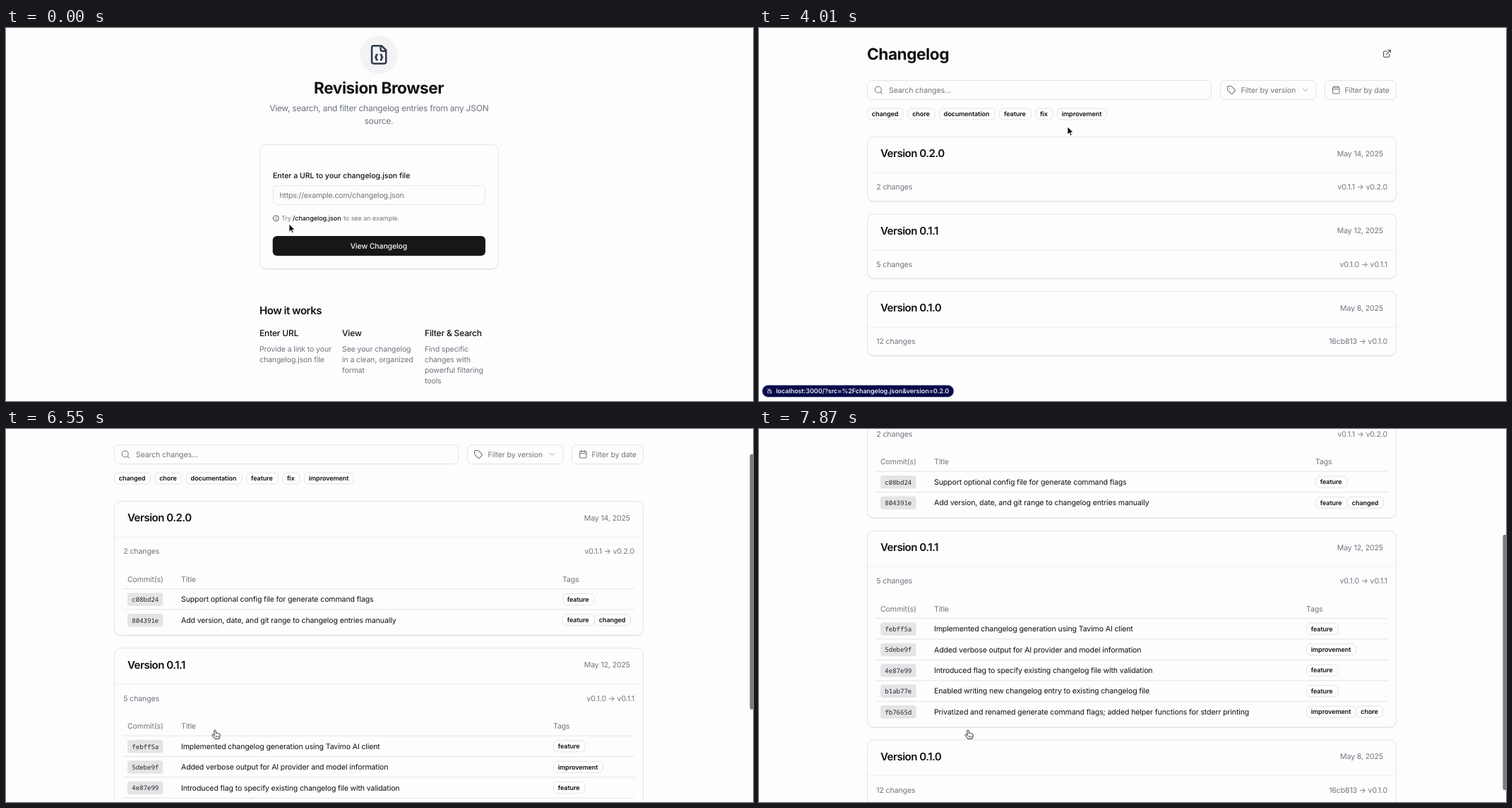
These frames come from a looping animation (1058 by 529 pixels, 8000 ms). An HTML page:

```html
<!DOCTYPE html>
<html lang="en">
<head>
<meta charset="utf-8">
<title>Changelog demo</title>
<style>
  html, body { margin: 0; width: 100%; height: 100%; overflow: hidden; background: #fcfdfd; }
  svg { display: block; }
  text { font-family: Inter, sans-serif; white-space: pre; text-rendering: geometricPrecision; }
  .mono { font-family: "Noto Sans Mono", monospace; }
</style>
</head>
<body>
<svg id="stage" width="1058" height="529" viewBox="0 0 1058 529"></svg>
<script>
const stage = document.getElementById('stage');
const LOOP = 8000, TICK = 148.5;
const INK = '#111113', MUTED = '#71747f', GRAY = '#74747b', LINE = '#e3e4e7', PAPER = '#fdfdfd';

// Type scale: font size and tracking in px
const TYPE = { xs: [9.05, -0.07], sm: [10.57, -0.13], base: [12.07, -0.28], xl: [15.09, -0.53], h1: [22.63, -0.46] };

// Keys are [tick, ...values]; values are interpolated linearly
const CURSOR = [[3, 401, 278], [8, 437, 268], [11, 437, 268], [14, 455, 300], [17, 456, 308], [22, 456, 308],
  [25, 445, 176], [27, 437, 140], [28, 437, 140], [30, 436, 131], [33, 405, 180], [35, 388, 228],
  [36, 388, 228], [40, 298, 426], [42, 296, 427]];
const SCROLL = [[42, 0], [43, 14], [44, 52], [45, 106], [46, 161], [47, 203], [48, 232], [49, 243.5],
  [50, 243.5], [51, 240], [52, 231], [53, 218.5]];

const RELEASES = [
  { version: '0.2.0', date: 'May 14, 2025', count: 2, range: 'v0.1.1 → v0.2.0', openAt: 36, tagX: 788.5, rows: [
    ['c08bd24', 'Support optional config file for generate command flags', 'feature'],
    ['804391e', 'Add version, date, and git range to changelog entries manually', 'feature', 'changed']] },
  { version: '0.1.1', date: 'May 12, 2025', count: 5, range: 'v0.1.0 → v0.1.1', openAt: 41, tagX: 775.5, rows: [
    ['febff5a', 'Implemented changelog generation using Tavimo AI client', 'feature'],
    ['5debe9f', 'Added verbose output for AI provider and model information', 'improvement'],
    ['4e87e99', 'Introduced flag to specify existing changelog file with validation', 'feature'],
    ['b1ab77e', 'Enabled writing new changelog entry to existing changelog file', 'feature'],
    ['fb7665d', 'Privatized and renamed generate command flags; added helper functions for stderr printing', 'improvement', 'chore']] },
  { version: '0.1.0', date: 'May 8, 2025', count: 12, range: '16cb813 → v0.1.0', openAt: Infinity, rows: [] }
];
const TAG_WIDTH = { changed: 51, chore: 38, documentation: 79, feature: 44.5, fix: 24.5, improvement: 70 };

const ICONS = {
  json: 'M15 2H6a2 2 0 0 0-2 2v16a2 2 0 0 0 2 2h12a2 2 0 0 0 2-2V7ZM14 2v4a2 2 0 0 0 2 2h4M10 12a1 1 0 0 0-1 1v1a1 1 0 0 1-1 1 1 1 0 0 1 1 1v1a1 1 0 0 0 1 1M14 18a1 1 0 0 0 1-1v-1a1 1 0 0 1 1-1 1 1 0 0 1-1-1v-1a1 1 0 0 0-1-1',
  info: 'M2 12a10 10 0 1 0 20 0a10 10 0 1 0-20 0M12 16v-4M12 8h.01',
  external: 'M15 3h6v6M10 14 21 3M18 13v6a2 2 0 0 1-2 2H5a2 2 0 0 1-2-2V8a2 2 0 0 1 2-2h6',
  search: 'M3 11a8 8 0 1 0 16 0a8 8 0 1 0-16 0M21 21l-4.3-4.3',
  tag: 'M12.6 2.6A2 2 0 0 0 11.2 2H4a2 2 0 0 0-2 2v7.2a2 2 0 0 0 .6 1.4l8.7 8.7a2.4 2.4 0 0 0 3.4 0l6.6-6.6a2.4 2.4 0 0 0 0-3.4ZM7.5 7.5h.01',
  chevron: 'M6 9l6 6 6-6',
  calendar: 'M8 2v4M16 2v4M5 4h14a2 2 0 0 1 2 2v14a2 2 0 0 1-2 2H5a2 2 0 0 1-2-2V6a2 2 0 0 1 2-2ZM3 10h18',
  lock: 'M5 11h14v10H5ZM8 11V7a4 4 0 0 1 8 0v4M3 3l18 18'
};

const clamp = v => Math.min(1, Math.max(0, v));

function track(keys, tick) {
  if (tick <= keys[0][0]) return keys[0].slice(1);
  const next = keys.findIndex(k => k[0] >= tick);
  if (next < 0) return keys[keys.length - 1].slice(1);
  const a = keys[next - 1], b = keys[next], f = (tick - a[0]) / (b[0] - a[0]);
  return a.slice(1).map((v, i) => v + (b[i + 1] - v) * f);
}

// y is the middle of the capital letters
function text(x, y, str, type, color = INK, { weight = 400, anchor = 'start', spacing, cls = '' } = {}) {
  const [size, tracking] = TYPE[type];
  return `<text class="${cls}" x="${x}" y="${y + size * 0.363}" font-size="${size}" font-weight="${weight}" fill="${color}"
    text-anchor="${anchor}" letter-spacing="${spacing ?? tracking}">${str.replace(/&/g, '&amp;')}</text>`;
}

const rect = (x, y, w, h, r, fill, stroke = 'none') =>
  `<rect x="${x}" y="${y}" width="${w}" height="${h}" rx="${r}" fill="${fill}" stroke="${stroke}"/>`;

const rule = (x1, x2, y, color = LINE) => `<path d="M${x1} ${y}H${x2}" stroke="${color}"/>`;

const icon = (name, cx, cy, size, color, width = 2) =>
  `<path d="${ICONS[name]}" transform="translate(${cx - size / 2} ${cy - size / 2}) scale(${size / 24})"
    fill="none" stroke="${color}" stroke-width="${width}" stroke-linecap="round" stroke-linejoin="round"/>`;

const card = (x, y, w, h) =>
  rect(x, y + 1, w, h, 9, 'none', '#e9eaec') + rect(x, y, w, h, 9, PAPER, LINE);

const tag = (x, y, name) =>
  rect(x, y - 8, TAG_WIDTH[name], 16, 5.5, PAPER, LINE) +
  text(x + 6.3, y, name, 'xs', INK, { weight: 600, spacing: -0.1 });

function homePage(tick, linkHover) {
  const steps = [
    [359, 'Enter URL', ['Provide a link to your', 'changelog.json file']],
    [476, 'View', ['See your changelog', 'in a clean, organized', 'format']],
    [593, 'Filter & Search', ['Find specific', 'changes with', 'powerful filtering', 'tools']]
  ];
  const filled = tick >= 10;
  return `<circle cx="528" cy="38" r="27" fill="#f3f3f6"/>` +
    icon('json', 528.2, 37.8, 30.2, '#303a4c') +
    text(528, 85, 'Revision Browser', 'h1', INK, { weight: 700, anchor: 'middle' }) +
    text(528.3, 114, 'View, search, and filter changelog entries from any JSON', 'base', MUTED, { anchor: 'middle' }) +
    text(528, 132, 'source.', 'base', MUTED, { anchor: 'middle' }) +
    card(359.5, 165.5, 338, 176) +
    text(378, 209.6, 'Enter a URL to your changelog.json file', 'sm', INK, { weight: 500, spacing: -0.03 }) +
    rect(378.5, 223.5, 300, 27, 6, PAPER, LINE) +
    text(387.5, 237, filled ? '/changelog.json' : 'https://example.com/changelog.json', 'sm', filled ? INK : GRAY, { spacing: -0.19 }) +
    icon('info', 382.3, 270, 9.4, '#3f3f46', 2.4) +
    text(390, 270, 'Try', 'xs', GRAY) +
    text(406, 270, '/changelog.json', 'xs', INK, { weight: 500 }) +
    (linkHover ? rule(406, 475, 274.8, INK) : '') +
    text(478, 270, 'to see an example.', 'xs', GRAY) +
    rect(377.7, 295.1, 301.3, 27.8, 6, '#171717') +
    text(528, 309.3, 'View Changelog', 'sm', '#f7f7f7', { weight: 500, anchor: 'middle', spacing: -0.15 }) +
    text(359, 401, 'How it works', 'xl', INK, { weight: 600 }) +
    steps.map(([x, title, lines]) =>
      text(x, 433, title, 'base', INK, { weight: 500, spacing: -0.2 }) +
      lines.map((line, i) => text(x, 455.3 + i * 15.1, line, 'sm', MUTED)).join('')).join('');
}

function commitTable(y, { rows, tagX }) {
  return text(172, y + 110.5, 'Commit(s)', 'sm', GRAY) + text(248, y + 110.5, 'Title', 'sm', GRAY) +
    text(tagX - 0.5, y + 110.5, 'Tags', 'sm', GRAY) +
    rows.map(([hash, title, ...tags], i) => {
      const mid = y + 139 + i * 29.4;
      let x = tagX;
      return rule(166, 890, mid - 14.8) + rect(172, mid - 9, 50.5, 18.5, 3.5, '#e4e4e7') +
        text(178.3, mid + 0.4, hash, 'xs', '#27272a', { cls: 'mono', spacing: 0 }) +
        text(248, mid, title, 'sm') +
        tags.map(name => {
          const pill = tag(x, mid, name);
          x += TAG_WIDTH[name] + 0.5;
          return pill;
        }).join('');
    }).join('');
}

function releaseCard(y, release, tick, hovered) {
  const open = clamp((tick - release.openAt + 1) / 2);
  const extra = open * (69.5 + 29.4 * (release.rows.length - 1));
  const height = 91 + extra;
  const svg = card(153.5, y, 749, height) +
    (hovered ? rect(154, y + 51, 748, 39.5, 0, '#f8f9fb') : '') +
    rule(154, 902, y + 50.7, '#eeeff1') +
    text(172, y + 23.5, 'Version ' + release.version, 'xl', INK, { weight: 600 }) +
    text(884, y + 23.5, release.date, 'sm', MUTED, { anchor: 'end' }) +
    text(166.3, y + 71, release.count + ' changes', 'sm', MUTED) +
    text(890, y + 71, release.range, 'sm', MUTED, { anchor: 'end' }) +
    (open ? `<svg x="150" y="${y}" width="760" height="${height}" viewBox="150 ${y} 760 ${height}">${commitTable(y, release)}</svg>` : '');
  return [svg, height];
}

function changelogPage(tick, scroll) {
  let x = 153.5, y = 154.5;
  const tags = Object.keys(TAG_WIDTH).map(name => {
    const pill = tag(x, 122, name);
    x += TAG_WIDTH[name] + 6.4;
    return pill;
  }).join('');
  const hovered = tick >= 34 && tick < 39 ? 0 : tick >= 39 && tick < 43 ? 1 : -1;
  const cards = RELEASES.map((release, i) => {
    const [svg, height] = releaseCard(y, release, tick, i === hovered);
    y += height + 18.5;
    return svg;
  }).join('');
  return `<g transform="translate(0 ${-scroll})">` +
    text(153, 37, 'Changelog', 'h1', INK, { weight: 700 }) +
    icon('external', 889.5, 36.3, 13, '#3f3f46') +
    rect(153.5, 74.5, 487, 27, 6, PAPER, LINE) + icon('search', 169.3, 88, 13.5, GRAY, 1.8) +
    text(184, 88, 'Search changes...', 'sm', GRAY) +
    rect(653.5, 74.5, 135.5, 27, 6, PAPER, LINE) + icon('tag', 669, 88, 13, GRAY) +
    text(682.5, 88, 'Filter by version', 'sm', GRAY) + icon('chevron', 773.5, 88, 12, '#a3a3a8') +
    rect(801.5, 74.5, 101, 27, 6, PAPER, LINE) + icon('calendar', 817.3, 87.8, 12.5, GRAY) +
    text(829.5, 88, 'Filter by date', 'sm', GRAY) +
    tags + cards + '</g>' +
    (scroll ? rect(1053.5, scroll * 0.686, 6, 362, 2.5, '#7b7b7b') : '');
}

const statusBubble = () =>
  rect(4.5, 506.5, 271.5, 17, 8.5, '#080a4a', '#a9abc4') + icon('lock', 15, 514.8, 8, '#d5d6e6', 2.4) +
  text(24, 515, 'localhost:3000/?src=%2Fchangelog.json&version=0.2.0', 'xs', '#e6e7f2', { weight: 600 });

function pointer(x, y, hand) {
  const shape = hand
    ? 'M-1.3 1.2C-1.3-.4 1-.4 1.1 1.2L1.5 4.6C2 4 2 4 2.2 4C3.2 3.9 3.6 4.5 3.7 5C4.6 4.5 5.4 4.9 5.6 5.6C6.7 5.3 7.2 6 7.2 7C7.2 9.6 6.4 10.4 6 12.4H-.4C-.9 10.8-3 9.3-4 7.4C-4.5 6.2-3 5.6-2.1 6.6L-.8 7.8Z'
    : 'M0 0V11.2L2.6 8.8L4.4 12.8L6.2 12L4.5 8.1H8Z';
  const [fill, stroke] = hand ? ['#fff', '#111'] : ['#000', '#fff'];
  const folds = hand ? '<path d="M1.2 8v2.4M3 8v2.4M4.8 8v2.4" stroke="#111" stroke-width=".7"/>' : '';
  return `<g transform="translate(${x} ${y})"><path d="${shape}" fill="${fill}" stroke="${stroke}" stroke-width=".9" stroke-linejoin="round"/>${folds}</g>`;
}

function render(tick) {
  const [x, y] = track(CURSOR, tick), [scroll] = track(SCROLL, tick);
  const home = tick < 19;
  const linkHover = home && x > 406 && x < 475 && y > 264 && y < 276;
  const hand = linkHover || (!home && (tick >= 35 || (y > 154 && y < 245)));
  stage.innerHTML = (home ? homePage(tick, linkHover) : changelogPage(tick, scroll)) +
    (tick >= 25 && tick < 29 ? statusBubble() : '') + pointer(x, y, hand);
}

let shown = -1;
function loop() {
  const tick = Math.floor((performance.now() % LOOP + 8) / TICK);
  if (tick !== shown) render(shown = tick);
  requestAnimationFrame(loop);
}
loop();
</script>
</body>
</html>
```
